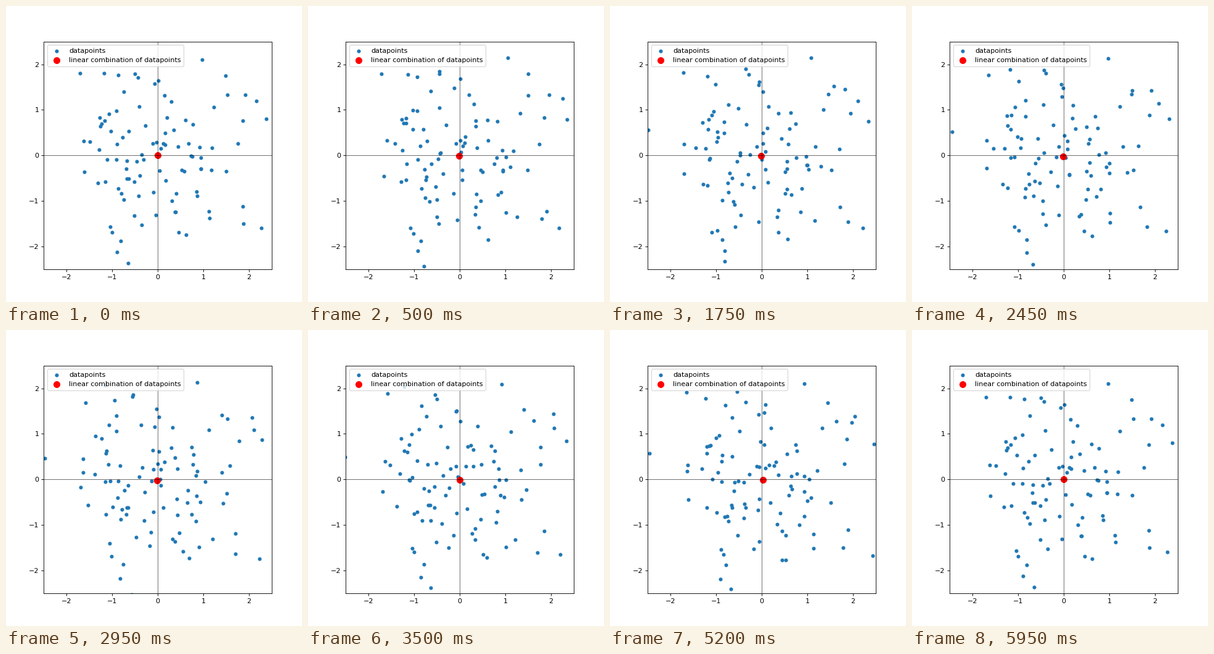
These frames come from a looping animation (480 by 480 pixels, 6000 ms). A matplotlib script:

```python
import numpy as np
import matplotlib.pyplot as plt
from matplotlib.animation import FuncAnimation

STEPS = 20      # frames per move between two poses
MOVES = 6
NOISE = 0.12

# A centred cloud, five jittered copies of it, and back to the start.
rng = np.random.RandomState(0)
cloud = rng.randn(100, 2)
cloud -= cloud.mean(axis=0)
poses = [cloud]
for _ in range(MOVES - 1):
    poses.append(cloud + NOISE * rng.randn(*cloud.shape))
poses.append(cloud)


def points_at(frame):
    move, step = divmod(frame, STEPS)
    u = step / (STEPS - 1)
    return (1 - u) * poses[move] + u * poses[move + 1]


plt.rcParams["font.family"] = "DejaVu Sans"
fig, ax = plt.subplots(figsize=(6, 6), dpi=80)
ax.set_aspect("equal")
ax.set(xlim=(-2.5, 2.5), ylim=(-2.5, 2.5),
       xticks=range(-2, 3), yticks=range(-2, 3))
ax.axhline(0, color="k", lw=0.5)
ax.axvline(0, color="k", lw=0.5)

dots = ax.scatter(*cloud.T, s=20, color="tab:blue", label="datapoints")
center = ax.scatter([0], [0], s=80, color="red",
                    label="linear combination of datapoints")
ax.legend(loc="upper left", fontsize=10)


def draw(frame):
    pts = points_at(frame)
    dots.set_offsets(pts)
    center.set_offsets([pts.mean(axis=0)])
    return dots, center


anim = FuncAnimation(fig, draw, frames=STEPS * MOVES, interval=50,
                     repeat=True, repeat_delay=0)
plt.show()
```
